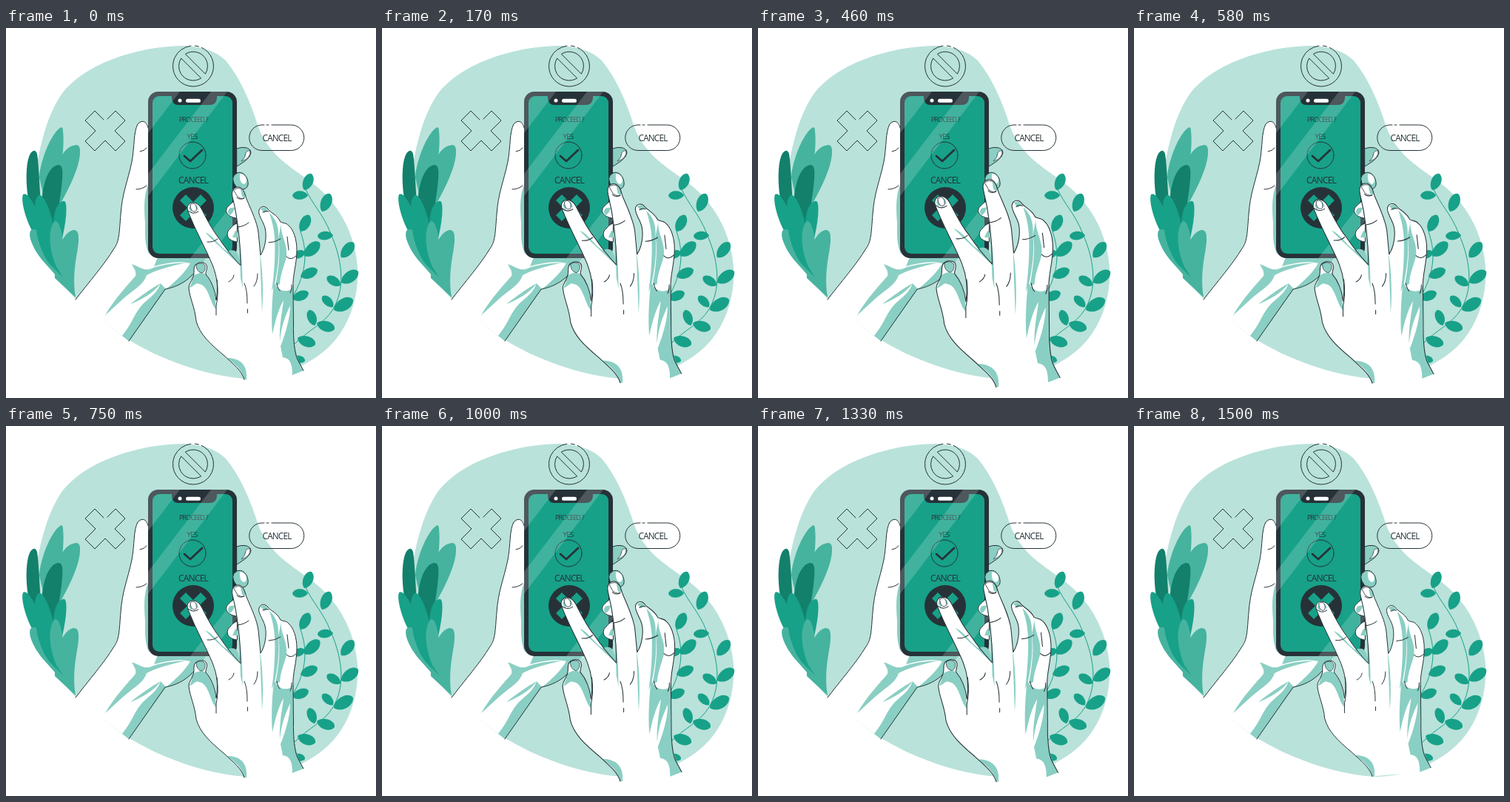
An HTML page with a canvas for the animation above (1.54 s loop, 500 px wide and 500 px high).

```html
<!DOCTYPE html>
<html lang="en">
<head>
<meta charset="utf-8">
<title>Cancel</title>
<style>
html, body { margin: 0; width: 100%; height: 100%; overflow: hidden; background: #fff; }
canvas { display: block; width: 500px; height: 500px; }
</style>
</head>
<body>
<canvas id="stage"></canvas>
<script>
const LOOP = 1540, STEP = 1000 / 24;
const DARK = '#263238', GREEN = '#17a188', DEEP = '#13806c', LIGHT = '#46b39f';
const PALE = '#b9e2da', SHADE = '#8acfc3', WHITE = '#fff';

const canvas = document.getElementById('stage');
const ratio = window.devicePixelRatio || 1;
canvas.width = canvas.height = 500 * ratio;
const ctx = canvas.getContext('2d');

function draw(d, fill, stroke, width = 1) {
  const path = typeof d === 'string' ? new Path2D(d) : d;
  if (fill) { ctx.fillStyle = fill; ctx.fill(path); }
  if (stroke) { ctx.strokeStyle = stroke; ctx.lineWidth = width; ctx.stroke(path); }
}
const line = (d, width) => draw(d, null, DARK, width);

function circle(x, y, r, from = 0, to = Math.PI * 2) {
  const path = new Path2D();
  path.arc(x, y, r, from, to);
  return path;
}

function box(x, y, w, h, r) {
  const path = new Path2D();
  path.roundRect(x, y, w, h, r);
  return path;
}

// Tight tracking; the type size follows from the natural width of the label.
function label(text, x, middle, width, weight = 400) {
  const setFont = px => {
    ctx.font = `${weight} extra-condensed ${px}px "Open Sans", "Noto Sans", sans-serif`;
    ctx.letterSpacing = `${-0.07 * px}px`;
  };
  setFont(10);
  const size = 10 * width / ctx.measureText(text).width;
  setFont(size);
  ctx.textAlign = 'center';
  ctx.fillStyle = DARK;
  ctx.fillText(text, x, middle + size * 0.36);
}

function leaf(tipX, tipY, baseX, baseY) {
  const dx = tipX - baseX, dy = tipY - baseY, k = 0.37;
  const at = (along, side) => `${baseX + dx * along - dy * side} ${baseY + dy * along + dx * side}`;
  draw(`M${at(0, 0)}C${at(0.2, k)} ${at(0.85, k)} ${at(1, 0)}C${at(0.95, -k)} ${at(0.2, -k)} ${at(0, 0)}Z`, GREEN);
}

const branchLeaves = [
  [413, 197, 403, 219], [387, 226, 408, 226], [438, 224, 427, 248], [410, 253, 398, 275],
  [421, 281, 442, 280], [470, 290, 453, 310], [424, 290, 403, 308], [476, 329, 453, 344],
  [434, 336, 452, 348], [421, 327, 398, 336], [469, 367, 443, 381], [428, 362, 442, 377],
  [409, 358, 387, 366], [410, 381, 417, 402], [444, 407, 420, 399], [418, 428, 394, 419],
  [404, 450, 387, 445], [404, 303, 386, 309]
];

function drawBackdrop() {
  draw('M240 24C172 25 106 50 76 88C53 121 42 172 37 220C33 265 50 322 94 366L158 417C172 425 186 433 200 440C240 458 282 471 325 474C372 474 420 453 447 419C469 391 477 354 475 322C471 275 448 233 408 205C378 184 354 168 341 134C331 102 317 68 297 44C282 30 263 25 240 24Z', PALE);
  draw('M75 134C64 138 47 174 45 202L55 246C72 216 80 166 77 139Q77 135 75 134Z', LIGHT);
  draw('M95 158C80 159 70 177 69 195L69 245C84 220 101 186 100 166Q100 158 95 158Z', LIGHT);
  draw('M37 166C27 169 25 206 31 236L50 275C46 237 45 188 42 170Q40 165 37 166Z', DEEP);
  draw('M70 185C54 188 45 224 49 260L68 268C71 236 78 207 76 191Q75 184 70 185Z', DEEP);
  draw('M23 225C19 234 29 272 48 293L66 312C56 275 41 240 30 227Q26 223 23 225Z', GREEN);
  draw('M44 226C37 232 38 253 43 272L72 312C68 272 58 237 49 228Q46 225 44 226Z', GREEN);
  draw('M77 234C66 236 62 260 64 290L72 300C79 275 83 250 81 238Q80 233 77 234Z', GREEN);
  draw('M34 273C28 279 37 300 51 316L94 364C84 334 65 295 46 277Q39 270 34 273Z', LIGHT);
  draw('M91 273C78 275 65 302 66 338L94 364C88 326 99 300 98 283Q98 272 91 273Z', LIGHT);
  draw('M43 255C36 267 45 301 59 319L77 337C77 304 67 274 59 258Q49 245 43 255Z', GREEN);
  draw('M66 261C56 272 58 299 68 323L77 337C80 311 78 279 71 264Q68 260 66 261Z', LIGHT);

  draw('M404 216C414 239 428 250 439 278C457 320 457 354 442 380C429 401 408 408 389 428', null, GREEN, 1);
  draw('M398 275C407 301 408 328 386 366', null, GREEN, 1);
  for (const item of branchLeaves) leaf(...item);
}

function drawIcons() {
  const x = 253, y = 51.5, cut = 0.23;
  line(circle(x, y, 27.5, -1.15, 4.6));
  line(circle(x, y, 27.5, -1.48, -1.3));
  for (const turn of [0, Math.PI]) {
    const half = circle(x, y, 19.5, turn - Math.PI * 0.75 + cut, turn + Math.PI / 4 - cut);
    half.closePath();
    line(half);
  }
  line('M137 123L148 112L161 125L147 139L161 153L148 166L134 152L120 166L107 153L121 139L107 125L120 112L132 124');

  line('M359 131H385.5A17.2 17.2 0 0 1 385.5 165.5H346A17.2 17.2 0 0 1 346 131H349M352 131H355');
  label('CANCEL', 366, 148.5, 39, 500);
}

function drawArm() {
  draw('M193 135C191 125 183 124 178 130C172 141 174 160 170 181C164 209 157 223 155 252C153 277 153 289 146 298C132 321 113 342 94 367L166 423L215 353C239 348 250 338 264 321L274 305L193 305Z', WHITE);
  draw('M193 210C185 227 187 248 188 263C188 278 187 291 193 305Z', SHADE);
  draw('M170 319C181 323 188 330 199 324C214 319 229 318 243 317C222 322 203 327 190 334C187 344 177 351 168 358C155 368 147 377 134 388C148 364 166 346 175 335C177 329 172 324 170 319Z', SHADE);
  draw('M205 310L271 310C260 327 250 344 216 353C231 341 242 330 249 318C233 314 217 318 200 322Z', SHADE);
  draw('M216 353L166 423L157 416C174 394 171 389 185 373C197 362 204 358 209 345Z', SHADE);
  draw('M209 345C194 353 180 364 168 373C182 368 200 358 209 345Z', SHADE);
  line('M192 135C190 125 183 124 178 130C172 141 174 160 170 181C164 209 157 223 155 252C153 277 153 289 146 298C132 321 113 342 94 367');
  line('M166 423L215 353C239 348 250 338 266 317M176 218Q184 218 190 213M181 167Q187 166 190 162');
}

function drawPhone() {
  draw(box(192, 86, 120, 225, 14), DARK);
  draw(box(198, 92, 108, 213, 9), GREEN);
  draw('M224 91H285V95Q284 104 275 104H233Q225 104 224 95Z', DARK);
  label('PROCEED ?', 253.5, 124, 39);
  label('YES', 251.5, 146.5, 14);
  line(circle(252, 172, 18));
  line('M241 173L249 180L265 165', 2.8);
  label('CANCEL', 253, 205.5, 40, 500);
  draw(circle(253, 243, 28), DARK);
  draw('M243 225L253 235L263 225L271 233L261 243L271 253L263 261L253 251L243 261L235 253L245 243L235 233Z', GREEN);

  ctx.save();
  ctx.clip(box(192, 86, 120, 225, 14));
  const gloss = 'rgba(255,255,255,.18)';
  draw('M192 86H235L192 142Z', gloss);
  draw('M277 86H299L192 227V197Z', gloss);
  draw('M312 230V261L273 311H249Z', gloss);
  ctx.restore();
  draw(circle(235, 98, 2.5), WHITE);
  draw(box(243, 95.8, 20, 5, 2.5), WHITE);
}

function drawGrip() {
  draw('M312 163C320 160 330 161 331 168C330 176 323 180 312 187Z', SHADE, DARK);
  draw('M330 166Q331 176 318 180Q324 175 324 169Q325 165 330 166Z', WHITE, DARK, 0.7);
  draw('M312 196C321 192 328 203 327 212C325 219 318 219 312 216Q301 202 312 196Z', SHADE, DARK);
  draw('M316 197C326 198 327 208 322 211Q315 210 316 197Z', WHITE);
  draw('M312 233C306 234 303 239 300 241C294 248 300 256 312 257Z', WHITE, DARK);
  draw('M309 243C300 241 298 249 302 253Q307 251 309 243Z', SHADE);
  draw('M312 264C306 266 304 271 301 273C296 281 302 288 312 289Z', WHITE, DARK);
  draw('M310 274Q314 275 313 283L306 283Z', SHADE);
}

const thumbAndIndex = 'C318 462 308 455 294 442C275 426 262 414 257 396C255 376 248 365 247 351C247 345 251 343 252 338C256 331 252 325 256 320C260 316 267 316 270 319C274 324 269 329 270 333C277 341 282 352 284 368C287 352 286 338 279 320C270 298 256 274 246 248C243 240 248 235 254 236C261 237 264 244 267 250C273 262 281 276 289 286C297 298 305 308 317 321';
const otherFingers = 'C317 290 313 257 306 228C304 219 309 214 315 215C322 217 323 225 325 231C333 250 339 262 341 276L344 307C350 298 353 282 350 270C347 260 340 252 342 246C344 240 351 240 354 245C358 250 366 252 371 262C374 264 379 263 382 267C388 272 393 285 393 300C393 320 387 335 388 350L388.500 400C388 420 390 440 394 448L402 463';
const handEdge = 'M322 475' + thumbAndIndex + otherFingers;

function drawHand(scale) {
  ctx.save();
  ctx.translate(324, 344);
  ctx.scale(scale, scale);
  ctx.translate(-324, -344);
  draw(handEdge + 'L387 469L322 475Z', WHITE);
  // Shadows
  draw('M269 276C283 291 297 302 314 319L317 321C315 303 310 297 299 302C289 296 280 280 269 276Z', SHADE);
  draw('M308 234C313 253 314 276 317 300C320 322 319 338 320 352L317 338C316 300 314 269 308 234Z', SHADE);
  draw('M343 300L346 384C348 361 347 332 344 310Z', SHADE);
  draw('M356 250C365 258 369 268 368 284C370 308 367 326 363 346L359 356C363 330 364 303 363 284C362 269 359 260 356 250Z', SHADE);
  draw('M372 264C370 280 381 290 379 309C376 322 371 331 370 346L364 348C369 324 371 300 368 284Z', SHADE);
  draw('M362 344Q370 359 384 354L388 348L388 400C388 425 392 447 402 463L387 469C387 454 384 446 374 445L371 430C379 410 384 390 384 375C378 388 372 402 370 424C369 400 374 380 375 368C369 378 364 394 360 414C358 390 360 364 362 344Z', SHADE);
  draw('M299 446C314 446 327 453 325 475H322C319 461 310 455 299 446Z', SHADE);
  draw('M253 335C262 329 267 331 270 333C277 341 283 354 284 380C276 374 274 347 261 346C257 343 253 350 248 351Q252 343 253 335Z', SHADE);
  // Nails and fingertips
  draw('M257 320C262 316 267 318 269 321C270 327 267 331 264 331Q257 329 257 320Z', SHADE, DARK, 0.7);
  draw('M247 244C250 234 259 236 260 246Q255 243 250 249Z', SHADE);
  draw('M249 239C253 234 259 239 257 247C253 250 249 246 249 239Z', WHITE, DARK, 0.8);
  draw('M308 219C313 214 322 216 323 228Q320 233 313 228Z', WHITE, DARK, 0.8);
  draw('M317 218Q323 220 323 229L319 228Z', SHADE);
  draw('M344 244Q351 240 354 247L349 250Z', SHADE);

  line(handEdge);
  line('M285 340C287 356 286 366 284 375V388M272 289Q280 290 286 285M313 269Q322 268 328 263M355 290Q363 290 371 285');
  line('M301 343Q307 340 308 334M322 345C325 352 326 360 326 372M326.500 380V385M335 349Q340 343 340 332M379 309Q385 315 392 308M366 345Q367 352 370 355M386 347Q386 355 384 358M347 249Q351 246 355 248');
  line('M246 247Q253 253 260 248M312 229Q316 233 322 230M380 282L382 300');
  ctx.restore();
}

// Time in ms, size of the pulse from 0 to 1
const pulse = [[0, .1], [30, .03], [333, .87], [400, 1], [583, .45], [750, .1], [795, .03],
  [1000, .45], [1083, .76], [1167, 1], [1500, 0], [LOOP, .1]];

function pulseAt(time) {
  const next = Math.max(1, pulse.findIndex(key => key[0] >= time));
  const [t0, v0] = pulse[next - 1], [t1, v1] = pulse[next];
  return v0 + (v1 - v0) * (time - t0) / (t1 - t0);
}

function render(now) {
  const time = Math.floor((now % LOOP + 5) / STEP) * STEP;
  ctx.setTransform(ratio, 0, 0, ratio, 0, 0);
  ctx.lineJoin = ctx.lineCap = 'round';
  ctx.fillStyle = WHITE;
  ctx.fillRect(0, 0, 500, 500);
  drawBackdrop();
  drawIcons();
  drawArm();
  drawPhone();
  drawGrip();
  drawHand(0.989 + 0.109 * pulseAt(Math.min(time, LOOP)));
}

const start = performance.now();
function tick() {
  render(performance.now() - start);
  requestAnimationFrame(tick);
}
tick();
</script>
</body>
</html>
```
